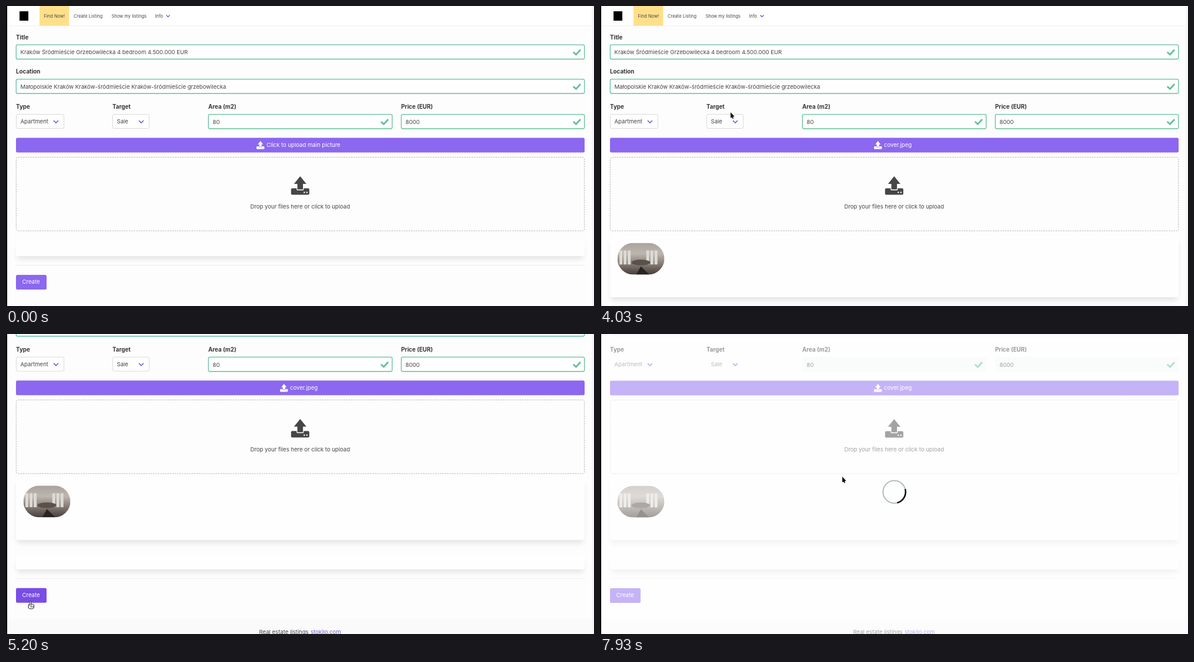
Write an HTML page with a canvas that moves like this. It is 1000 by 511 pixels and loops after 8000 ms.

```html
<!DOCTYPE html>
<html lang="en">
<head>
<meta charset="utf-8">
<title>Create listing</title>
<style>
  html, body { margin: 0; width: 100%; height: 100%; overflow: hidden; background: #fdfdfd; }
  canvas { display: block; width: 1000px; height: 511px; }
</style>
</head>
<body>
<canvas id="stage"></canvas>
<script>
const W = 1000, H = 511, LOOP = 8000, STEP = 130;
const LEFT = 17, RIGHT = 984, FULL = RIGHT - LEFT, ROW = 25, TAU = Math.PI * 2;
const FONT = 'Inter, "Open Sans", sans-serif';
const PAPER = '#fdfdfd', PURPLE = '#8c67ef', LINK = '#7957d5', GREEN = '#62c09b';
const INK = '#363636', BODY = '#454545', LINE = '#dbdbdb';
const cv = document.getElementById('stage'), c = cv.getContext('2d');
const dpr = window.devicePixelRatio || 1;
cv.width = W * dpr;
cv.height = H * dpr;

// Timeline, in ms
const NAMED = 130, THUMB = 650, SCROLL = 4160, BOUNCE = 4420, SETTLED = 4680, CLICK = 5330;
const SCROLL_END = 145, OVERSHOOT = 12, FADE = 390, SPIN = 845;
const MOVES = [
  { from: 650, to: 1300, x: 319, y: 273 },
  { from: 2860, to: 4030, x: 222, y: 181 },
  { from: 4680, to: 5200, x: 41, y: 455 },
  { from: 5590, to: 6110, x: 412, y: 243 }
];

const progress = (t, from, to) => Math.min(1, Math.max(0, (t - from) / (to - from)));
const smooth = k => k * k * (3 - 2 * k);

function pointer(t) {
  return MOVES.reduce((p, m) => {
    const k = smooth(progress(t, m.from, m.to));
    return { x: p.x + (m.x - p.x) * k, y: p.y + (m.y - p.y) * k };
  }, { x: 400, y: 238 });
}

function scrollAt(t) {
  if (t > BOUNCE) return SCROLL_END + OVERSHOOT * Math.exp((BOUNCE - t) / 200);
  return (SCROLL_END + OVERSHOOT) * Math.sin(progress(t, SCROLL, BOUNCE) * Math.PI / 2);
}

function rect(x, y, w, h, fill) {
  c.fillStyle = fill;
  c.fillRect(x, y, w, h);
}

function box(x, y, w, h, r, fill, stroke, lw = 1) {
  c.beginPath();
  c.roundRect(x, y, w, h, r);
  if (fill) { c.fillStyle = fill; c.fill(); }
  if (stroke) { c.strokeStyle = stroke; c.lineWidth = lw; c.stroke(); }
}

function path(pts) {
  c.beginPath();
  pts.forEach(p => c.lineTo(...p));
}

function poly(pts, fill) {
  path(pts);
  c.fillStyle = fill;
  c.fill();
}

function line(pts, color, lw) {
  path(pts);
  c.strokeStyle = color;
  c.lineWidth = lw;
  c.stroke();
}

function arc(x, y, r, from, sweep, color, lw) {
  c.beginPath();
  c.arc(x, y, r, from, from + sweep);
  c.strokeStyle = color;
  c.lineWidth = lw;
  c.stroke();
}

function disc(x, y, r, fill) {
  c.beginPath();
  c.arc(x, y, r, 0, TAU);
  c.fillStyle = fill;
  c.fill();
}

// Draws shapes around a local origin
function placed(x, y, k, shapes) {
  c.save();
  c.translate(x, y);
  c.scale(k, k);
  shapes();
  c.restore();
}

function faint(alpha, shapes) {
  c.save();
  c.globalAlpha *= alpha;
  shapes();
  c.restore();
}

// y is the middle of the capital letters
function text(s, x, y, color = BODY, size = 9.55, weight = 400) {
  c.font = `${weight} ${size}px ${FONT}`;
  c.fillStyle = color;
  c.fillText(s, x, y + size * 0.364);
}

const label = (s, x, y) => text(s, x, y, INK, 9.8, 700);

function chevron(x, y, w = 4, lw = 1.6) {
  line([[x - w, y - w / 2], [x, y + w / 2], [x + w, y - w / 2]], LINK, lw);
}

function select(name, s, x, y, w, fade) {
  label(name, x, y);
  faint(1 - fade, () => box(x + .5, y + 13, w - 1, ROW - 1, 2.5, '#fff', LINE));
  faint(1 - fade * .3, () => text(s, x + 7.5, y + ROW));
  chevron(x + w - 14, y + ROW + .5);
}

function input(name, s, x, y, w, fade) {
  label(name, x, y);
  const top = y + 13, mid = top + ROW / 2;
  box(x, top, w, ROW, 2.5, fade ? '#f3f9f6' : '#fff');
  faint(1 - fade, () => box(x + .3, top + .1, w - .6, ROW - .6, 2.5, null, GREEN, 1.3));
  text(s, x + 7.5, mid + .3);
  placed(x + w - 14.5, mid, 1, () => line([[-4.8, 0], [0, 4.2], [7.5, -4]], GREEN, 2.8));
}

function uploadIcon(x, y, k, color, hole) {
  placed(x, y, k, () => {
    box(-15.5, 4.5, 31, 11, 2, color);
    box(-6, 3, 12, 5, 1.5, hole);
    rect(-4.8, -4, 9.6, 10.5, color);
    poly([[0, -16], [10.5, -3], [-10.5, -3]], color);
    for (const dot of [7, 11.5]) disc(dot, 11.5, 1.2, hole);
  });
}

function panel(y, h) {
  faint(1, () => {
    c.shadowColor = 'rgba(10,10,10,.1)';
    c.shadowBlur = 10 * dpr;
    c.shadowOffsetY = 5 * dpr;
    box(LEFT + 2, y + 6, FULL - 4, h - 6, 3, '#fefefe');
  });
  box(LEFT, y, FULL, h, 3, '#fefefe');
}

// A room in soft tones: pale walls, bright windows, dark floor
function photo(x, y, w, h) {
  placed(x, y, 1, () => {
    box(0, 0, w, h, h / 2);
    c.clip();
    const wall = c.createLinearGradient(0, 0, 0, h);
    ['#aaa29d', '#bdb6af', '#857a73', '#453e3b'].forEach((tone, i) => wall.addColorStop(i / 3, tone));
    rect(0, 0, w, h, wall);
    for (const side of [.17, .74]) {
      for (let i = -1; i < 2; i++) rect(w * side + i * 7 - 3, h * .24, 5, h * .44, '#dcdad5');
    }
    c.beginPath();
    c.ellipse(w / 2, h * .62, w * .2, h * .09, 0, 0, TAU);
    c.fillStyle = '#5a514b';
    c.fill();
    poly([[w * .4, h], [w / 2, h * .74], [w * .68, h]], '#272423');
  });
}

function navbar() {
  rect(0, 0, W, 33, '#fff');
  rect(0, 33, W, 1, '#efefef');
  rect(57, 0, 50.5, 33.5, '#ffe08a');
  rect(23, 9, 15, 16, '#000');
  const item = (s, x) => text(s, x, 17, BODY, 7.5);
  item('Find Now!', 64.5);
  item('Create Listing', 115);
  item('Show my listings', 179.5);
  item('Info', 253.5);
  chevron(275.5, 17, 3, 1.4);
}

function uploads(named, hover, fade) {
  box(LEFT, 224.5, FULL, ROW, 2.5, PURPLE);
  const x = named ? 483 : 443;
  uploadIcon(x - 10.3, 237, .43, '#fff', PURPLE);
  text(named ? 'cover.jpeg' : 'Click to upload main picture', x, 237, '#fff');

  faint(1 - fade * .4, () => {
    c.setLineDash([2.5, 1.6]);
    box(LEFT + .3, 257.5, FULL - .6, 125.5, 3.5, hover ? '#f8f7fd' : PAPER, hover ? LINK : '#b5b5b5');
  });
  uploadIcon(500.3, 306, 1, '#464646', PAPER);
  text('Drop your files here or click to upload', 415.5, 342);
}

function footer(y) {
  rect(0, y, W, 26, '#fafafa');
  text('Real estate listings', 430.5, y + 22);
  text('stokilo.com', 518, y + 22, LINK);
  rect(0, y + 26, W, 60, '#000');
  for (const x of [489.5, 514.5]) disc(x, y + 40, 10, '#fff');
}

function page({ fade, named, thumb, overDrop, overCreate }) {
  navbar();
  input('Title', 'Kraków Śródmieście Grzebowilecka 4 bedroom 4.500.000 EUR', LEFT, 53, FULL, fade);
  input('Location', 'Małopolskie Kraków Kraków-śródmieście Kraków-śródmieście grzebowilecka',
    LEFT, 111.5, FULL, fade);
  select('Type', 'Apartment', LEFT, 171.5, 82, fade);
  select('Target', 'Sale', 181, 171.5, 63, fade);
  input('Area (m2)', '80', 344, 171.5, 313, fade);
  input('Price (EUR)', '8000', 672, 171.5, 312, fade);
  uploads(named, overDrop, fade);

  const shift = thumb ? 120 : 0;
  if (thumb) {
    panel(390, 106);
    photo(29.5, 403.5, 80, 54);
  }
  panel(400 + shift, 26);
  rect(LEFT, 441 + shift, FULL, 1, '#ededed');
  box(LEFT, 458 + shift, 52, ROW, 2.5, overCreate ? '#794de6' : PURPLE);
  text('Create', 27.5, 470 + shift, '#fff');
  footer(511 + shift);
}

function arrow() {
  const head = [[0, 0], [0, 9.5], [6.6, 7]], tail = [[2, 6], [4.4, 10.6]];
  line([...head, head[0]], '#fff', 1.4);
  line(tail, '#fff', 3);
  poly(head, '#111');
  line(tail, '#111', 1.8);
}

function hand() {
  box(-3, 5, 9.5, 8, 3, '#fff', '#222');
  box(-1, 0, 2.4, 9, 1.2, '#fff', '#222');
  rect(-.4, 6, 1.4, 4, '#fff');
  for (let i = 0; i < 3; i++) rect(1 + i * 1.8, 8, .7, 3, '#333');
}

function spinner(t) {
  const turn = (t - 6240) / SPIN * TAU - TAU / 24;
  arc(500.5, 269, 19.2, 0, TAU, '#b4bdbd', 2);
  arc(500.5, 269, 19.2, turn, TAU / 4, '#000', 2.4);
}

function draw(t) {
  const scroll = scrollAt(t), fade = progress(t, CLICK, CLICK + FADE), mouse = pointer(t);
  const thumb = t >= THUMB, scrolling = t > SCROLL && t <= SETTLED;
  const y = mouse.y + scroll;
  const over = (top, bottom) => thumb && !fade && !scrolling && y >= top && y < bottom;
  const overDrop = over(257, 383);
  const overCreate = over(578, 604) && mouse.x < 69;

  c.setTransform(dpr, 0, 0, dpr, 0, 0);
  rect(0, 0, W, H, PAPER);
  placed(0, -scroll, 1, () => page({ fade, named: t >= NAMED, thumb, overDrop, overCreate }));

  rect(996, 0, 4, 657 - scroll, '#f6f6f6');
  if (scrolling) box(996, Math.min(110, scroll * .76), 5, 390, 2, '#77747a');
  if (fade) {
    rect(0, 0, W, H, `rgba(255,255,255,${fade * .5})`);
    spinner(t);
  }
  rect(0, 0, 2, H, '#000');
  if (thumb) placed(mouse.x, mouse.y, 1, overDrop || overCreate || over(225, 250) ? hand : arrow);
}

function tick(now) {
  const t = now % LOOP;
  draw(Math.floor(t / STEP) * STEP);
  requestAnimationFrame(tick);
}
requestAnimationFrame(tick);
</script>
</body>
</html>
```
